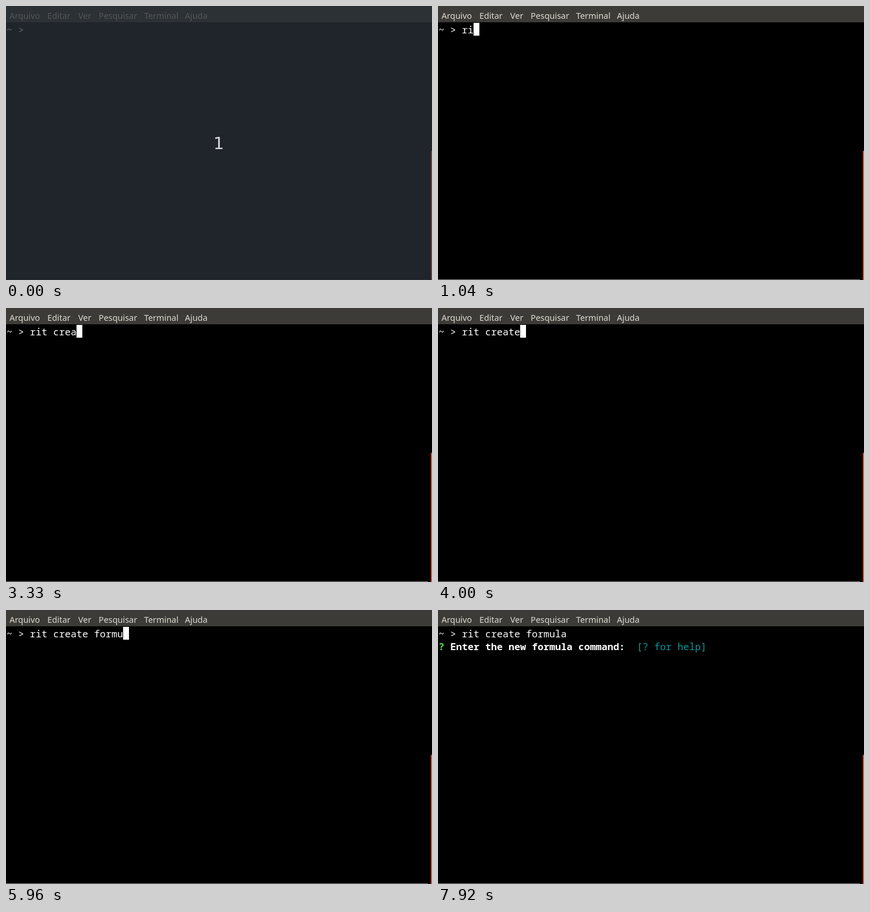
These frames come from a looping animation (731 px wide and 471 px high, 8 s). An HTML page:

```html
<!DOCTYPE html>
<html lang="pt-BR">
<head>
<meta charset="utf-8">
<title>Terminal</title>
<style>
  html, body { margin: 0; width: 100%; height: 100%; overflow: hidden; background: #000; }
  svg { display: block; width: 731px; height: 471px; }
  text { white-space: pre; }
  .menu { font: 14.4px "Noto Sans", "Open Sans", sans-serif; fill: #dfdbd2; }
  .term { font: 16.667px "Noto Sans Mono", "DejaVu Sans Mono", monospace; fill: #fff; }
  .bold { font-weight: 700; }
  .count { font: 29px "DejaVu Sans", sans-serif; fill: #d6d7d8; text-anchor: middle; }
  .dim .menu { fill: #565657; }
  .dim .term { fill: #65676a; }
</style>
</head>
<body>
<svg id="stage" viewBox="0 0 731 471">
  <rect id="back" width="731" height="471"/>
  <rect id="bar" width="731" height="28"/>
  <rect id="edge" x="729" y="249" width="2" height="222"/>
  <rect id="base" y="470" width="724" height="1"/>
  <g id="menu"></g>
  <text id="line" class="term" x="1" y="47"></text>
  <g id="question">
    <text class="term bold" x="1" y="69" style="fill:#4ee84a">?</text>
    <text class="term bold" x="21" y="69">Enter the new formula command:</text>
    <text class="term" x="341" y="69" style="fill:#0a989b">[? for help]</text>
  </g>
  <rect id="cursor" width="10" height="22" fill="#fff"/>
  <text id="count" class="count" x="365" y="246">1</text>
</svg>
<script>
const LOOP = 8000, CELL = 10, ROW = 22;
const PROMPT = "~ > ", COMMAND = "rit create formula";
const KEYS = [790, 1040, 1380, 2040, 2420, 2790, 3040, 3330, 3670,
              4000, 4420, 4710, 5040, 5330, 5670, 5960, 6380, 6670];
const HIDDEN = [[0, 330], [1920, 2000], [7210, 7290], [7920, LOOP]];
const START = 40, ASK = 7330;
const MENU = [["Arquivo", 6], ["Editar", 71], ["Ver", 124],
              ["Pesquisar", 159], ["Terminal", 237], ["Ajuda", 307]];

const $ = id => document.getElementById(id);
const show = (id, on) => $(id).setAttribute("display", on ? "inline" : "none");
const fill = (id, color) => $(id).setAttribute("fill", color);

for (const [label, x] of MENU) {
  const item = document.createElementNS("http://www.w3.org/2000/svg", "text");
  item.setAttribute("class", "menu");
  item.setAttribute("x", x);
  item.setAttribute("y", 22);
  item.textContent = label;
  $("menu").append(item);
}

function draw(t) {
  const counting = t < START, asked = t >= ASK;
  const typed = KEYS.filter(k => t >= k).length;

  $("stage").classList.toggle("dim", counting);
  fill("back", counting ? "#20242b" : "#000");
  fill("bar", counting ? "#2b3135" : "#3c3b37");
  fill("edge", counting ? "#60443c" : "#c95b3d");
  fill("base", counting ? "#2b2e34" : "#8b8a86");
  show("count", counting);

  $("line").textContent = PROMPT + COMMAND.slice(0, typed);
  show("question", asked);

  const col = asked ? 47 : PROMPT.length + typed;
  $("cursor").setAttribute("x", 1 + col * CELL);
  $("cursor").setAttribute("y", 29 + (asked ? ROW : 0));
  show("cursor", !HIDDEN.some(([a, b]) => t >= a && t < b));
}

const begin = performance.now();
function tick() {
  draw((performance.now() - begin) % LOOP);
  requestAnimationFrame(tick);
}
draw(0);
requestAnimationFrame(tick);
</script>
</body>
</html>
```
